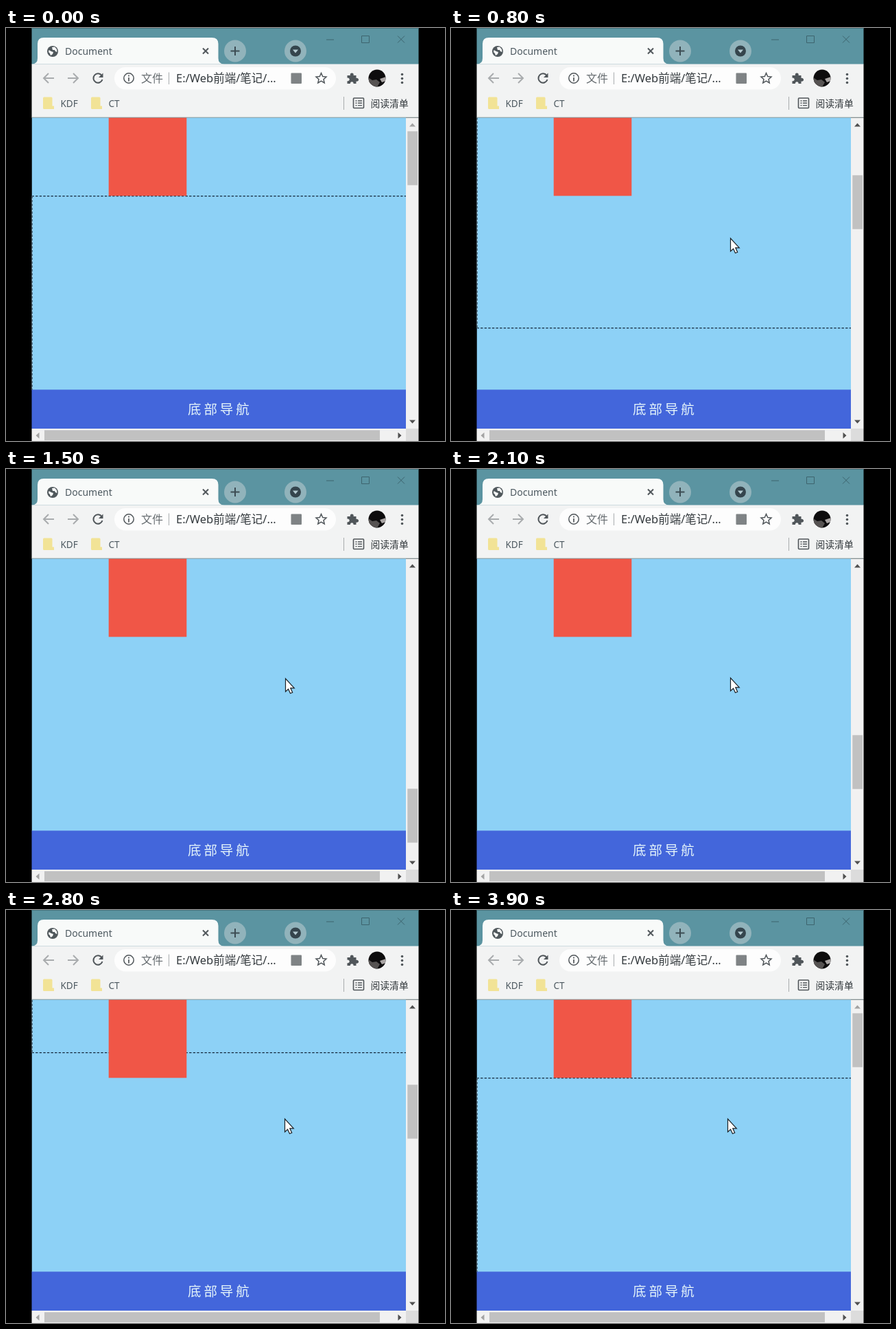
Write an HTML page that moves like this. It is 640x601 px and loops after 4000 ms.

```html
<!DOCTYPE html>
<html lang="zh">
<head>
<meta charset="utf-8">
<title>Document</title>
<style>
  @property --s { syntax: "<number>"; inherits: true; initial-value: 0; }

  html, body { margin: 0; width: 100%; height: 100%; overflow: hidden; background: #000; }
  svg { display: block; width: 640px; height: 601px; }
  text { font: 14px "Noto Sans", "Noto Sans CJK SC", "Noto Sans CJK", sans-serif; fill: #4d5960; }
  .line { fill: none; stroke: #50565a; stroke-width: 2; }
  .thin { stroke-width: 1; }
  .pale { stroke: #a9acae; }

  /* --s is the scroll thumb offset; the page moves 5.725px for each unit */
  #page { animation: scroll 4s infinite; }
  #box { transform: translateY(calc(var(--s) * -5.725px)); }
  #thumb { transform: translateY(calc(var(--s) * 1px)); }
  #up { animation: up 4s step-end infinite; }
  #cursor { animation: point 4s infinite; }

  @keyframes scroll {
    0%    { --s: 0;   animation-timing-function: step-end; }
    15%   { --s: 0;   animation-timing-function: steps(1); }
    17.5% { --s: 28;  animation-timing-function: steps(1); }
    20%   { --s: 64;  animation-timing-function: steps(7); }
    37.5% { --s: 315; animation-timing-function: steps(1); }
    40%   { --s: 336; animation-timing-function: steps(5); }
    52.5% { --s: 237; animation-timing-function: steps(7); }
    70%   { --s: 104; animation-timing-function: steps(6); }
    85%, 100% { --s: 0; }
  }
  @keyframes up {
    0%, 85%, 100% { fill: #a3a3a3; }
    17.5% { fill: #505050; }
  }
  @keyframes point {
    0%    { transform: translate(640px, 620px); animation-timing-function: step-end; }
    2.5%  { transform: translate(500px, 450px); animation-timing-function: steps(4); }
    12.5% { transform: translate(407px, 305px); animation-timing-function: step-end; }
    20%   { transform: translate(407px, 305px); animation-timing-function: steps(7); }
    37.5% { transform: translate(407px, 304px); animation-timing-function: steps(6); }
    52.5% { transform: translate(407px, 303px); animation-timing-function: steps(7); }
    70%   { transform: translate(406px, 303px); animation-timing-function: steps(6); }
    85%, 100% { transform: translate(403px, 303px); }
  }
</style>
</head>
<body>
<svg viewBox="0 0 640 601">
  <defs>
    <clipPath id="view"><rect x="37.5" y="130" width="545.5" height="397"/></clipPath>
    <clipPath id="face"><circle cx="541" cy="73" r="12.5"/></clipPath>
    <path id="folder" d="M0 1.5Q0 0 1.500 0H12Q13.500 0 13.500 1.500V13H16V17.500H1.500Q0 17.500 0 16Z" fill="#f2e396"/>
  </defs>
  <rect width="640" height="601"/>

  <!-- title bar -->
  <rect x="37.500" width="564" height="53" fill="#5b94a1"/>
  <rect x="37.500" width="564" height="1" fill="#47767f"/>
  <path d="M37.500 52.500Q46 52.500 46 44V23Q46 14 55 14H300Q309.500 14 309.500 23V44Q309.500 52.500 318 52.500Z" fill="#f8faf9"/>
  <circle cx="68" cy="34" r="8" fill="#50585c"/>
  <path d="M62.500 32L66 34L69 35L68 38L65 40L64 37L62 35ZM67 28L71 27.500L74 31L74.500 35L72 34L71 32L68 32Z" fill="#f8faf9"/>
  <text x="86" y="39.300">Document</text>
  <path class="line" d="M287 29.500L295 37.500M295 29.500L287 37.500"/>
  <g fill="#91b3bb">
    <circle cx="334" cy="33.500" r="16"/>
    <circle cx="422" cy="33.500" r="16"/>
  </g>
  <path class="line" d="M327.500 33.500H340.500M334 27V40" style="stroke:#3c4c53"/>
  <circle cx="422" cy="33.500" r="8" fill="#35454d"/>
  <path d="M418 31.500H426L422 36.500Z" fill="#b4cbd1"/>
  <path class="line thin" d="M467 17H478M518.500 11.500H529.500V21.500H518.500ZM571 11.500L581 21.500M581 11.500L571 21.500" style="stroke:#3d646e"/>

  <!-- toolbar -->
  <rect x="37.500" y="52.500" width="564" height="77.500" fill="#f2f3f3"/>
  <rect x="158" y="57" width="323" height="32.500" rx="16.200" fill="#fdfdfd"/>
  <path class="line pale" d="M70 73H55M62 66L55 73L62 80M90 73H105M98 66L105 73L98 80"/>
  <path class="line" d="M139.500 69A6.700 6.700 0 1 0 140.500 75"/>
  <path d="M141.500 65.500V72H135Z" fill="#50565a"/>
  <circle class="line" cx="179" cy="73" r="7.200" style="stroke-width:1.500"/>
  <path class="line" d="M179 72V77.500M179 68.500V70.500" style="stroke-width:1.700"/>
  <text x="197" y="79" style="font-size:16px;fill:#666c70">文件</text>
  <path class="line thin pale" d="M237.500 64.500V82"/>
  <text x="248" y="79" style="font-size:16.500px;fill:#33393d">E:/Web前端/笔记/...</text>
  <rect x="415.500" y="65.500" width="15.500" height="15.500" rx="1" fill="#7f8385"/>
  <path class="line" d="M459.500 65.500L461.700 70.500L467 71L463 74.700L464.200 80L459.500 77.200L454.800 80L456 74.700L452 71L457.300 70.500Z" style="stroke-width:1.500"/>
  <path d="M497.500 69H502A2.500 2.500 0 1 1 506.500 69H510.500V73A2.500 2.500 0 1 1 510.500 77.500V81H506.500A2.300 2.300 0 1 0 502 81H497.500V77A2.300 2.300 0 1 0 497.500 72.800Z" fill="#50565a"/>
  <g clip-path="url(#face)">
    <rect x="528" y="60" width="26" height="26" fill="#0d0c0d"/>
    <path d="M528 72L534 76L540 75L545 79L541 86H528Z" fill="#565352"/>
    <path d="M545 74L554 71V77L548 79Z" fill="#a9a5a4"/>
  </g>
  <g fill="#50565a">
    <circle cx="577.500" cy="67.500" r="1.800"/>
    <circle cx="577.500" cy="73.500" r="1.800"/>
    <circle cx="577.500" cy="79.500" r="1.800"/>
  </g>

  <!-- bookmarks -->
  <use href="#folder" x="54" y="100.500"/>
  <use href="#folder" x="124" y="100.500"/>
  <text x="79.500" y="115" style="font-size:13.500px">KDF</text>
  <text x="149.500" y="115" style="font-size:13.500px">CT</text>
  <path class="line thin pale" d="M492.500 100V119"/>
  <rect class="line" x="506.500" y="102" width="15" height="14.500" rx="1" style="stroke-width:1.600"/>
  <path class="line" d="M509.500 106H511.500M513 106H519M509.500 109.300H511.500M513 109.300H519M509.500 112.600H511.500M513 112.600H519" style="stroke-width:1.400"/>
  <text x="531.500" y="115" style="font-size:13.800px;fill:#33393d">阅读清单</text>

  <!-- page -->
  <g id="page">
    <g clip-path="url(#view)">
      <rect x="37.500" y="130" width="546" height="397" fill="#8dd1f6"/>
      <g id="box" fill="none" stroke="#14283c" stroke-width="1.200" stroke-dasharray="3.400 2.200">
        <path d="M37.500 244.600H584M37.500 803H584"/>
        <path d="M38 244.600V803" stroke="#c4e7f9" stroke-dasharray="none"/>
        <path d="M38 244.600V803"/>
      </g>
      <rect x="149.700" y="130" width="113.600" height="114.300" fill="#f05647"/>
    </g>
    <rect x="37.500" y="129.700" width="564" height="1" fill="#8b9b9d"/>
    <rect x="37.500" y="526.300" width="545.500" height="56.700" fill="#4366db"/>
    <text x="265" y="562.300" style="font-size:19.500px;font-weight:500;letter-spacing:3.900px;fill:#e4f4fa">底部导航</text>

    <!-- scrollbars -->
    <path d="M583 130.700H601.500V583H583ZM37.500 583H583V601H37.500Z" fill="#f1f1f1"/>
    <rect x="583" y="583" width="18.500" height="18" fill="#dcdcdc"/>
    <rect id="thumb" x="585.300" y="150.300" width="14.700" height="78.400" fill="#c1c1c1"/>
    <rect x="56" y="585.300" width="489" height="14.700" fill="#c1c1c1"/>
    <path id="up" d="M588 143.500L592.500 138.500L597 143.500Z"/>
    <path d="M588 570.500L592.500 575.500L597 570.500ZM571.500 588.500L576.500 593L571.500 597.500Z" fill="#505050"/>
    <path d="M48.500 588.500L43.500 593L48.500 597.500Z" fill="#a3a3a3"/>
  </g>

  <path id="cursor" d="M.500 1V20L4.600 16.200L7.500 22.500L10.700 21.200L7.800 14.800H13.300Z" fill="#fff" stroke="#1c2126" stroke-width="1.200"/>
</svg>
</body>
</html>
```
